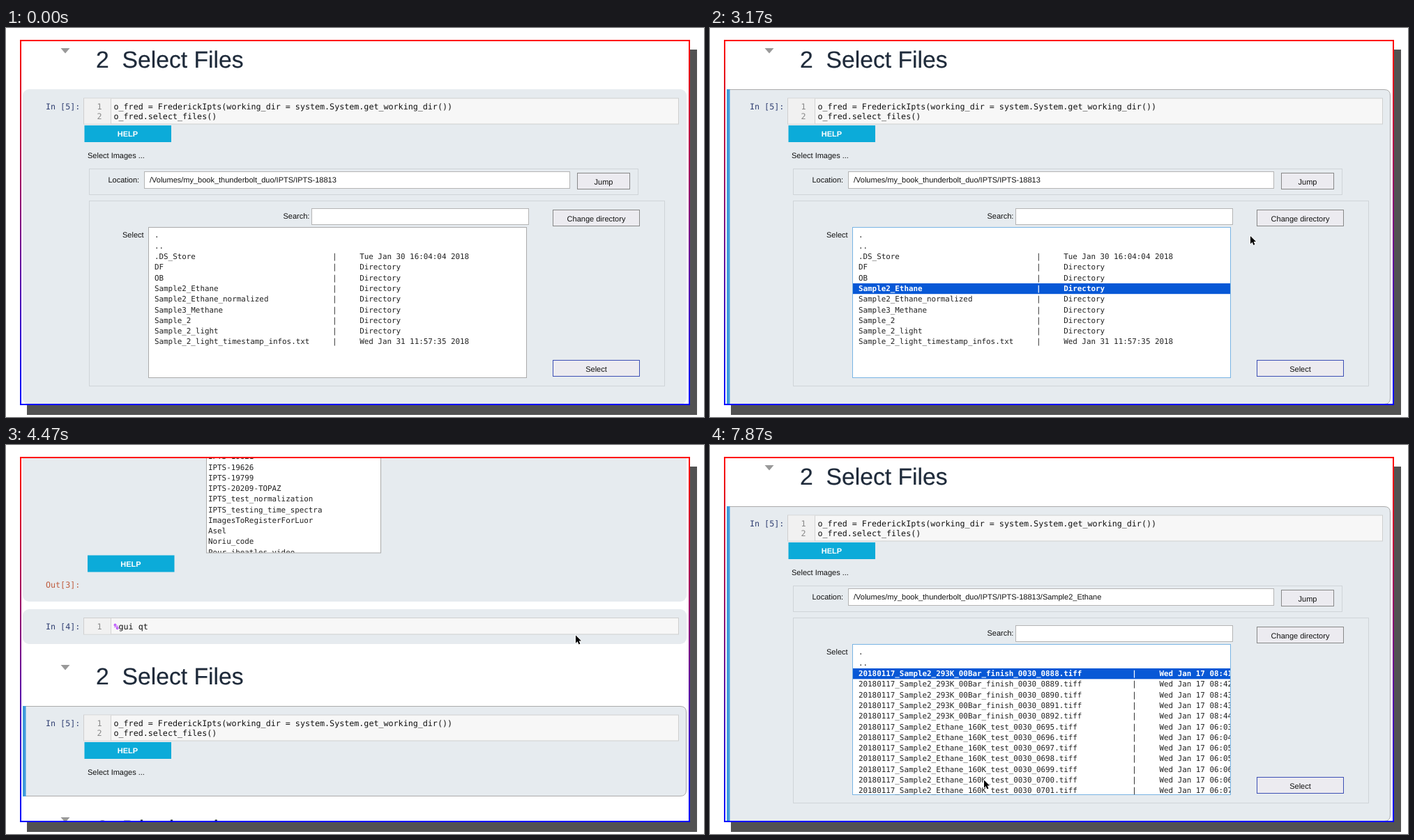
An HTML page for the animation above (8000 ms loop, 1001 px wide and 559 px high).

```html
<!DOCTYPE html>
<html lang="en">
<head>
<meta charset="utf-8">
<title>Select Files</title>
<style>
html, body { margin: 0; width: 100%; height: 100%; overflow: hidden; background: #fff; }
svg { display: block; width: 100%; height: 100%; }
text { white-space: pre; font: 11px "Liberation Sans", Arial, sans-serif; fill: #111; text-rendering: geometricPrecision; }
.h { font-size: 33.7px; fill: #1e2a3a; stroke: #1e2a3a; stroke-width: .2px; }
.code { font: 11.7px "DejaVu Sans Mono", monospace; }
.row { font: 10.87px "DejaVu Sans Mono", monospace; fill: #222; }
.bold { font-weight: bold; }
.mid { text-anchor: middle; }
</style>
</head>
<body>
<svg viewBox="0 0 1001 559">
  <defs>
    <linearGradient id="edge" gradientUnits="userSpaceOnUse" x1="0" y1="19" x2="0" y2="540">
      <stop stop-color="#f00"/><stop offset="1" stop-color="#00f"/>
    </linearGradient>
    <clipPath id="page"><rect x="22" y="19" width="957" height="521"/></clipPath>
    <clipPath id="list"><rect x="205" y="287" width="541" height="215.5"/></clipPath>
    <clipPath id="folders"><rect x="288" y="-300" width="249" height="167.5"/></clipPath>
  </defs>
  <rect x="30" y="31" width="961" height="525" fill="#525252"/>
  <rect x="21" y="18" width="959" height="523" fill="#fff"/>
  <g clip-path="url(#page)">
    <g id="doc"></g>
    <path id="cursor" d="M0 0V11.2L2.6 8.8L4.5 12.9L6.4 12L4.6 8H8Z"
      fill="#000" stroke="#fff" stroke-width="1.4" paint-order="stroke"/>
  </g>
  <rect x="21" y="18" width="959" height="523" fill="none" stroke="url(#edge)" stroke-width="2"/>
</svg>
<script>
const LOOP = 8000, STEP = 100, PHASE = 70;
const CLICK_DIR = 2370, HOVER = 3570, CLICK_CHANGE = 4070, CLEAR = 4370,
      RELOAD = 4670, SCROLL_END = 5070, CLICK_FILE = 6270;
const SCROLL = 287, ROW = 15.3;

// Pointer path: time, x, y
const PATH = [
  [270, 83, 329], [370, 170, 338], [470, 245, 344], [570, 279, 346], [670, 279, 346],
  [970, 277, 364], [1170, 279, 372], [2670, 279, 372], [2870, 400, 352], [2970, 560, 330],
  [3070, 700, 310], [3170, 775, 299], [3370, 800, 288], [3570, 811, 280], [3870, 817, 273.5],
  [4970, 817, 273.5], [5170, 750, 286], [5270, 600, 310], [5370, 470, 328], [5470, 411, 331],
  [5970, 399, 326], [6370, 399, 326], [6670, 398, 370], [7070, 395, 456], [7570, 395, 485],
  [7670, 395, 485], [7870, 393, 481.5]
];

const folderRows = ["Sample2_Ethane", "Sample2_Ethane_normalized", "Sample3_Methane", "Sample_2", "Sample_2_light"];
const entry = (name, pad, info) => name.padEnd(pad) + "|     " + info;
const dirList = [".", "..",
  entry(".DS_Store", 39, "Tue Jan 30 16:04:04 2018"),
  ...["DF", "OB", ...folderRows].map(n => entry(n, 39, "Directory")),
  entry("Sample_2_light_timestamp_infos.txt", 39, "Wed Jan 31 11:57:35 2018")];

const shots = (label, first, hour, minutes) => minutes.map((m, i) =>
  entry(`20180117_Sample2_${label}_0030_0${first + i}.tiff`, 60, `Wed Jan 17 ${hour}:${m}`));
const fileList = [".", "..",
  ...shots("293K_00Bar_finish", 888, "08", ["41", "42", "43", "43", "44"]),
  ...shots("Ethane_160K_test", 695, "06", ["03", "04", "05", "05", "06", "06", "07"])];

const iptsList = ["IPTS-19621", "IPTS-19626", "IPTS-19799", "IPTS-20209-TOPAZ", "IPTS_test_normalization",
  "IPTS_testing_time_spectra", "ImagesToRegisterForLuor", "Asel", "Noriu_code", "Pour_ibeatles_video"];

const text = (x, y, s, cls = "", fill = "") =>
  `<text x="${x}" y="${y}" class="${cls}"${fill && ` style="fill:${fill}"`}>${s}</text>`;
const rect = (x, y, w, h, fill, more = "") =>
  `<rect x="${x}" y="${y}" width="${w}" height="${h}" fill="${fill}" ${more}/>`;
const box = (x, y, w, h, fill, stroke) => rect(x + .5, y + .5, w - 1, h - 1, fill, `stroke="${stroke}"`);

function cell(y, h, active) {
  if (!active) return rect(24, y, 952, h, "#e6ebef", 'rx="9"');
  return `<path d="M24.5 ${y + .5}H967q8.5 0 8.5 8.5V${y + h - 9}q0 8.5 -8.5 8.5H24.5Z" fill="#e6ebef" stroke="#ababab"/>`
    + rect(24, y, 4.5, h, "#3f9bdc");
}

function input(n, y, lines) {
  const h = 11 + 13.5 * lines.length;
  return text(57, y + 16.5, `In [${n}]:`, "code", "#303f72")
    + box(111, y, 854, h, "#f7f7f7", "#cfcfcf") + rect(112, y + 1, 38, h - 2, "#f1f1f1")
    + rect(150, y + 1, 1, h - 2, "#d2d2d2")
    + lines.map((s, i) => text(130.5, y + 16.5 + 13.5 * i, i + 1, "code", "#888")
      + text(154.5, y + 16.5 + 13.5 * i, s, "code")).join("");
}

const heading = (y, s) => `<path d="M78.5 ${y + 29}h13l-6.5 7.5z" fill="#999"/>` + text(129, y + 57, s, "h");
const help = (x, y) => rect(x, y, 124.5, 24, "#0cabd9") + text(x + 62, y + 16.2, "HELP", "bold mid", "#fff");

function button(x, y, w, label, stroke, hover) {
  const shade = hover ? rect(x + 1, y + 2, w, 24, "#8c9aa8", 'opacity=".6"') : "";
  return shade + box(x, y, w, 24, "#ecebf0", stroke) + text(x + w / 2, y + 16.5, label, "mid");
}

function listRows(rows, pick, focused) {
  return rows.map((s, i) => {
    const y = 290.4 + ROW * i, on = i === pick;
    return (on ? rect(205, y, 541, ROW, focused ? "#0758d6" : "#ccc") : "")
      + text(213, y + 11, s, on ? "row bold" : "row", on ? (focused ? "#fff" : "#000") : "");
  }).join("");
}

function above() {
  return cell(-400, 338)
    + box(287, -340, 251, 208.5, "#fff", "#aaa")
    + `<g clip-path="url(#folders)">${iptsList.map((s, i) => text(290, -266.6 + 15.25 * i, s, "row")).join("")}</g>`
    + help(117, -128.5) + text(57, -82.5, "Out[3]:", "code", "#bf5b3d")
    + cell(-51, 50)
    + input(4, -39, ['<tspan class="bold" style="fill:#a2f">%</tspan>gui qt']);
}

function chooser(t) {
  const files = t >= RELOAD;
  const focused = files ? t >= CLICK_FILE : t >= CLICK_DIR && t < CLICK_CHANGE;
  const pick = files ? (focused ? 2 : -1) : t >= CLICK_DIR ? 5 : -1;
  const hover = !files && t >= HOVER;
  return box(119, 202, 788, 38, "none", "#cfd4d8")
    + text(146.5, 222.3, "Location:") + box(198, 206, 611, 25, "#fff", "#b4b4b4")
    + text(206, 222.3, "/Volumes/my_book_thunderbolt_duo/IPTS/IPTS-18813" + (files ? "/Sample2_Ethane" : ""))
    + button(819, 208, 76, "Jump", "#888")
    + box(119, 248, 826, 267, "none", "#cfd4d8")
    + text(397.5, 274, "Search:") + box(438, 259, 312, 24, "#fff", "#b4b4b4")
    + button(784, 261, 125, "Change directory", hover && t >= CLICK_CHANGE ? "#5a8fc8" : "#888", hover)
    + text(167, 301, "Select") + box(204, 286, 543, 217, "#fff", focused ? "#78b4e4" : "#aaa")
    + `<g clip-path="url(#list)">${listRows(files ? fileList : dirList, pick, focused)}</g>`
    + button(784, 477, 125, "Select", "#3c4fb4");
}

function page(t) {
  const empty = t >= CLEAR && t < RELOAD, h = empty ? 130 : 453;
  return above() + heading(0, "2  Select Files")
    + cell(88, h, t >= CLICK_DIR)
    + input(5, 100.5, ["o_fred = FrederickIpts(working_dir = system.System.get_working_dir())", "o_fred.select_files()"])
    + help(112.5, 140) + text(117, 187.3, "Select Images ...")
    + (empty ? "" : chooser(t))
    + heading(88 + h + 1, "3  Display data");
}

function scrollAt(t) {
  if (t < CLEAR || t >= SCROLL_END) return 0;
  const p = Math.max(0, (t - RELOAD) / (SCROLL_END - RELOAD));
  return SCROLL * (1 - p * p * (3 - 2 * p));
}

function pointerAt(t) {
  const i = PATH.findIndex(p => p[0] > t);
  if (i < 0) return PATH[PATH.length - 1].slice(1);
  const [t0, x0, y0] = PATH[i - 1], [t1, x1, y1] = PATH[i], p = (t - t0) / (t1 - t0);
  return [x0 + (x1 - x0) * p, y0 + (y1 - y0) * p];
}

const doc = document.getElementById("doc"), cursor = document.getElementById("cursor");
let last = null;

function draw(time) {
  const t = Math.floor((time % LOOP - PHASE) / STEP) * STEP + PHASE;
  if (t === last) return;
  last = t;
  doc.innerHTML = page(t);
  doc.setAttribute("transform", `translate(0 ${scrollAt(t)})`);
  const shown = t >= PATH[0][0];
  cursor.setAttribute("visibility", shown ? "visible" : "hidden");
  if (shown) cursor.setAttribute("transform", `translate(${pointerAt(t)})`);
}

const start = performance.now();
function tick() {
  draw(performance.now() - start);
  requestAnimationFrame(tick);
}
tick();
</script>
</body>
</html>
```
